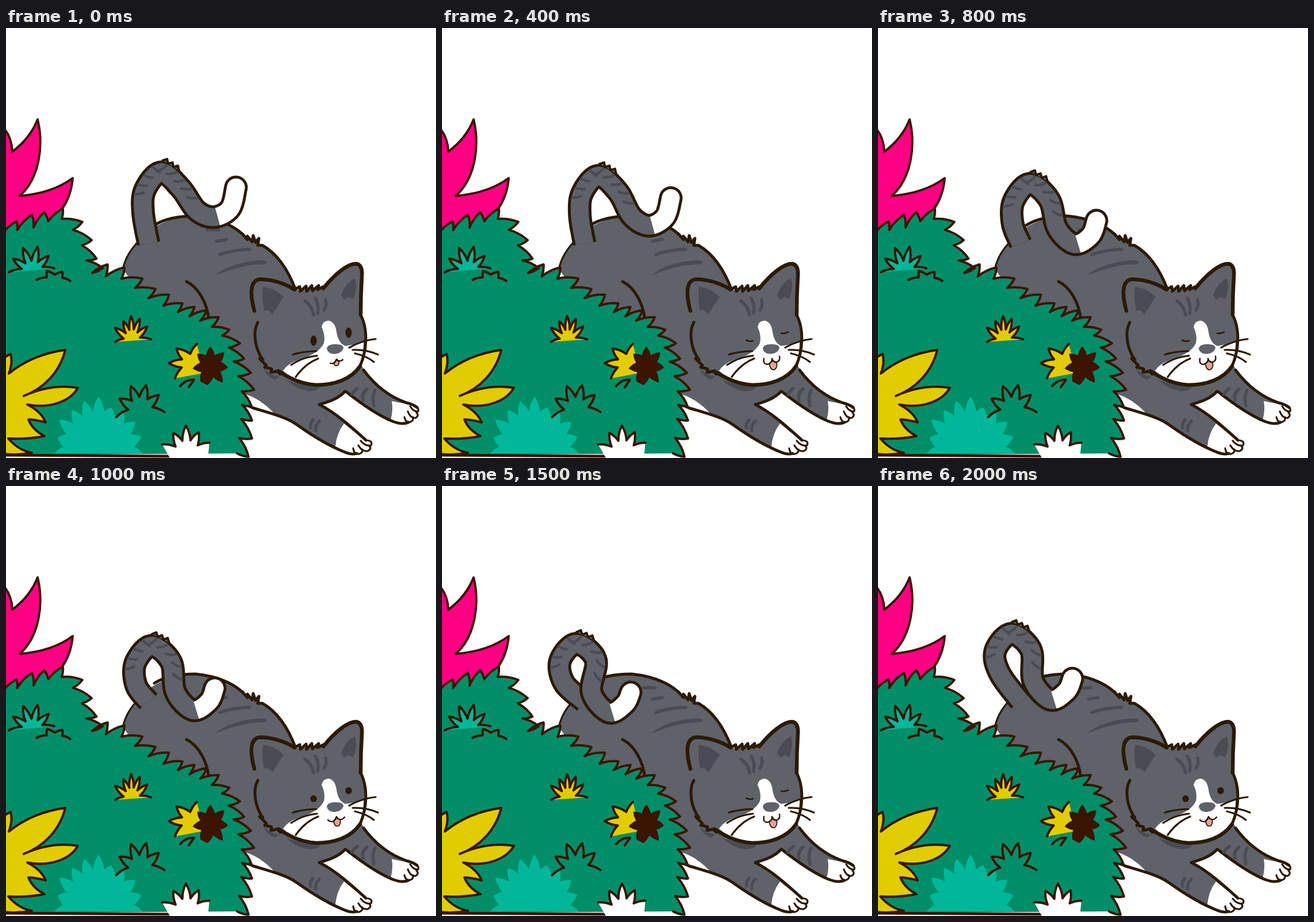
An HTML page for the animation above (2100 ms loop, 748x748 px).

```html
<!DOCTYPE html>
<html lang="en">
<head>
<meta charset="utf-8">
<title>Stretching cat</title>
<style>
  html, body { margin: 0; width: 100%; height: 100%; overflow: hidden; background: #fff; }
  svg { display: block; width: 100vw; height: 100vh; }
  path { stroke-linejoin: round; stroke-linecap: round; }
  .fur { fill: #5f6269; }
  .shade { fill: #4a4c53; }
  .white { fill: #fff; }
  .ink { fill: none; stroke: #2b1a06; stroke-width: 5; }
  .thin { stroke-width: 3.2; }
  .bold { stroke-width: 6.5; }
  .stripe { fill: none; stroke: #4a4c53; stroke-width: 5.5; }
  .butt { stroke-linecap: butt; }
  .line { fill: none; stroke: #3b1402; stroke-width: 4; }
  .dark { fill: #3b1402; }
  .pink { fill: #ff0082; }
  .green { fill: #008e69; }
  .teal { fill: #00b899; }
  .yellow { fill: #e0cc00; }
  .tongue { fill: #e2a49c; stroke: #2b1a06; stroke-width: 1.8; }
</style>
</head>
<body>
<svg viewBox="0 0 748 748" preserveAspectRatio="xMidYMid meet">
  <g id="torso">
    <path class="fur" d="M204 420C208 395 222 376 240 360C262 340 295 327 330 327C372 331 398 345 414 361L446 378C474 395 492 424 504 456L620 590C640 620 668 642 706 655L690 689C655 678 620 654 592 633C580 645 562 650 545 655C575 670 605 698 630 721L592 738C555 722 530 704 505 688C470 676 440 664 420 650L300 560Z"/>
    <path class="white" d="M412 636C430 640 450 652 468 672C450 668 432 662 416 656Z"/>
    <path class="white" d="M588 688C605 702 620 714 632 720Q640 728 628 736Q610 746 590 738L573 728Q575 705 588 688Z"/>
    <path class="white" d="M671 649Q690 653 708 656Q720 660 717 674Q710 686 690 689Q678 687 669 682Q674 665 671 649Z"/>
    <path class="ink thin" d="M203 420C208 398 218 384 232 369"/>
    <path class="ink" d="M258 343C274 333 300 327 330 327C368 331 396 344 413 360"/>
    <path class="ink" d="M411 358L420 368L420 362L428 372L430 361L434 373L440 366L438 378L446 378C474 394 492 424 504 456"/>
    <path class="ink" d="M314 441C336 452 350 480 353 508"/>
    <path class="ink" d="M622 595C642 622 668 642 697 652Q709 655 715 660M592 633C620 655 650 675 672 684Q690 691 700 686"/>
    <path class="ink" d="M590 632C578 645 562 650 545 655C575 670 605 698 626 717M416 655L430 661C460 670 488 677 506 690C534 710 564 728 590 738Q602 743 610 740"/>
    <path class="ink thin" d="M604 731Q605 742 614 741Q621 739 620 733M613 726Q619 737 629 736Q637 732 632 727M617 718Q625 728 635 726Q639 718 626 717"/>
    <path class="ink thin" d="M693 677Q696 688 704 685Q709 683 708 677M699 667Q704 680 713 678Q719 674 714 669M703 658Q709 668 717 667Q719 660 711 657"/>
    <path class="stripe" d="M545 684Q537 691 539 701M534 682Q528 688 530 696M642 630Q636 642 640 657M628 628Q618 636 621 648M611 627Q603 633 602 637"/>
    <path class="stripe" d="M366 371L383 368M350 351L370 351M372 394Q394 386 424 385"/>
    <path class="shade" d="M363 431Q390 407 446 404Q459 406 450 411Q410 411 363 431Z"/>
    <path class="shade" d="M448 592Q462 606 476 606L468 612Q452 605 448 592ZM488 613Q520 622 546 622Q548 631 528 632Q505 629 488 613Z"/>
  </g>

  <g id="tail"></g>

  <g id="head">
    <path class="fur" d="M432 492C424 460 426 438 445 436C468 438 488 446 502 456L553 453C572 428 594 408 610 410Q621 413 620 430L616 500C630 525 628 560 616 588C600 612 570 621 540 621C510 619 485 605 470 596C445 582 428 550 438 511Z"/>
    <path class="white" d="M549 520Q551 509 562 509Q573 512 575 529Q578 548 590 553Q606 551 622 547Q622 583 603 602C582 619 545 624 510 613Q492 606 482 596Q490 583 512 576Q545 566 553 548Q556 535 549 520Z"/>
    <path class="shade" d="M447 450Q467 452 483 468L474 481L464 498L455 490L449 492Q444 470 447 450ZM583 465Q590 444 607 435Q612 451 604 472L596 468L588 473Z"/>
    <path class="stripe" d="M520 475Q533 484 535 499M538 470Q545 482 542 496M556 473Q559 482 553 491"/>
    <path class="ink bold" d="M432 492C424 462 424 438 443 437C466 438 486 445 502 455M552 453C572 428 594 410 609 410Q621 412 619 433Q617 465 617 499"/>
    <path class="ink" d="M502 455L511 450L512 458L522 449L523 458L532 448L533 457L544 448L542 455L552 450M617 499C630 525 628 560 616 588"/>
    <path class="ink bold" d="M616 588C600 612 570 621 540 621C510 619 490 607 474 597"/>
    <path class="ink" d="M438 512C428 530 434 560 447 577L441 575L453 587L450 590L462 593L461 599L472 597L477 602"/>
    <path class="ink thin" d="M499 568Q520 562 540 562M496 586Q515 573 541 570M504 607Q520 584 543 575M597 556Q620 543 643 541M603 560Q626 559 647 568M607 566Q628 571 640 581"/>
    <path class="fur" d="M558 558Q559 550 573 550Q587 550 587 557Q584 566 572 567Q560 567 558 558Z"/>
  </g>
  <g id="face"></g>
  <g id="bush"></g>
</svg>

<script>
const NS = 'http://www.w3.org/2000/svg';
const $ = id => document.getElementById(id);
const INK = '#2b1a06', FUR = '#5f6269';

function add(parent, cls, d, style) {
  const p = document.createElementNS(NS, 'path');
  p.setAttribute('class', cls);
  p.setAttribute('d', d);
  if (style) p.setAttribute('style', style);
  parent.appendChild(p);
  return p;
}

let seed = 7;
const random = () => (seed = seed * 16807 % 2147483647) / 2147483647;

// Catmull-Rom point on a line of [x, y] points, with its unit tangent.
function along(pts, u) {
  const last = pts.length - 1;
  const i = Math.min(Math.floor(u), last - 1);
  const f = u - i;
  const axis = c => {
    const [p, a, b, q] = [-1, 0, 1, 2].map(n => pts[Math.max(0, Math.min(last, i + n))][c]);
    const m = b - p, w = 2 * p - 5 * a + 4 * b - q, z = 3 * a - p - 3 * b + q;
    return [a + (m * f + w * f * f + z * f ** 3) / 2, m + 2 * w * f + 3 * z * f * f];
  };
  const [x, dx] = axis(0), [y, dy] = axis(1);
  const len = Math.hypot(dx, dy) || 1;
  return { x, y, tx: dx / len, ty: dy / len };
}

// Point beside the line: s further along, out to its left.
function beside(pts, u, s, out) {
  const p = along(pts, u);
  return [p.x + p.tx * s + p.ty * out, p.y + p.ty * s - p.tx * out];
}

const at = p => p.map(v => v.toFixed(1)).join(' ');

// Joins valleys and tips with curves that bulge outwards.
function leaves(pts, bulge = 0.12) {
  return pts.map(([x, y], i) => {
    if (!i) return 'M' + at([x, y]);
    const [a, b] = pts[i - 1];
    return 'Q' + at([(a + x) / 2 + (y - b) * bulge, (b + y) / 2 - (x - a) * bulge]) + ' ' + at([x, y]);
  }).join('');
}

// Leaf tips fanned clockwise around a centre; angles in degrees, 0 to the right.
function fan(x, y, rx, ry, from, to, tips, inner) {
  const n = 2 * (tips - 1);
  return leaves(Array.from({ length: n + 1 }, (_, i) => {
    const a = (from + (to - from) * i / n) * Math.PI / 180;
    const r = i % 2 ? inner : 0.9 + 0.2 * random();
    return [x + rx * r * Math.cos(a), y - ry * r * Math.sin(a)];
  }));
}

const bush = $('bush');

function plant(cls, d, close = 'Z', outlined = true) {
  if (cls) add(bush, cls, d + close);
  if (outlined) add(bush, 'line', d);
}

function hedge(contour) {
  const pts = [];
  for (let u = 0; u < contour.length - 1; u += 0.5) {
    pts.push(beside(contour, u, 0, 0), beside(contour, u + 0.35, 9, 15 + 8 * random()));
  }
  return leaves([...pts, contour[contour.length - 1]]);
}

plant('pink', 'M-4 174Q10 190 11 215Q42 192 55 159C66 205 58 262 24 292C60 289 92 279 116 261Q113 300 88 326', 'L60 350L-4 350Z');
plant('green', hedge([
  [-3, 354], [48, 347], [97, 332], [132, 378], [150, 426], [201, 436], [248, 470],
  [299, 494], [338, 509], [376, 535], [396, 580], [410, 632], [409, 680], [402, 740]
]), 'L-3 743Z');
add(bush, 'line', 'M-3 743L150 744L302 745', 'stroke-width:5');

plant('teal', fan(46, 425, 40, 42, 180, 10, 6, 0.48));
plant('', fan(84, 440, 29, 20, 175, 0, 4, 0.55));
plant('teal', fan(161, 740, 78, 92, 180, 0, 11, 0.8), 'Z', false);
plant('yellow', 'M-3 573L8 567Q12 582 5 601C32 579 66 565 103 560C94 598 66 627 31 640C64 625 94 621 125 626C110 652 72 662 37 655Q61 667 69 686Q50 681 39 681Q46 699 67 710Q34 716 4 714Q22 735 45 739Q20 744 -3 741');
plant('yellow', fan(219, 546, 31, 46, 180, 5, 7, 0.48));
plant('yellow', fan(328, 584, 48, 36, 225, 85, 4, 0.5), 'L345 600Z');
plant('dark', fan(356, 588, 32, 34, 235, -100, 8, 0.6), 'Z', false);
add(bush, 'line', 'M303 623Q313 611 326 612M318 625L327 612');
plant('', fan(234, 668, 40, 48, 190, 0, 6, 0.55));
plant('white', fan(315, 750, 44, 56, 155, 30, 5, 0.6), 'L350 760L292 760Z');

// Time, top of the loop x and y, bottom of the hook x and y.
const swing = [
  [0, 270, 251, 362, 329],
  [400, 272, 257, 360, 344],
  [800, 264, 271, 342, 376],
  [1000, 253, 278, 325, 390],
  [1300, 238, 279, 300, 396],
  [1700, 231, 268, 286, 389],
  [2000, 232, 257, 300, 372]
];

function slope(k, j) {
  if (k === 0) return 0;
  const a = swing[k - 1], b = swing[Math.min(k + 1, swing.length - 1)];
  return (b[j] - a[j]) / (b[0] - a[0]);
}

function swingAt(ms) {
  let k = 0;
  while (k < swing.length - 2 && ms >= swing[k + 1][0]) k++;
  const span = swing[k + 1][0] - swing[k][0];
  const s = (ms - swing[k][0]) / span;
  const ease = s * s * (3 - 2 * s);
  return [1, 2, 3, 4].map(j =>
    swing[k][j] + (swing[k + 1][j] - swing[k][j]) * ease +
    span * s * (1 - s) * (slope(k, j) * (1 - s) - slope(k + 1, j) * s));
}

// Centre line of the tail, base to tip; the hook tightens as it sinks.
function tailLine(ms) {
  const [tx, ty, bx, by] = swingAt(ms);
  const drop = by - ty;
  const left = tx - 28;
  return [
    [248, 375], [left + (230 - left) * 0.3, ty + 69], [left, ty + 30],
    [tx, ty], [tx + 34, ty + 28],
    [bx - 30, by + 34 - 0.58 * drop], [bx, by], [bx + 28, by - 15], [bx + 38, by - 83 + 0.4 * drop]
  ];
}

function stretch(pts, from, to) {
  const n = Math.ceil((to - from) * 12);
  return 'M' + Array.from({ length: n + 1 }, (_, i) =>
    at(beside(pts, from + (to - from) * i / n, 0, 0))).join('L');
}

const tail = $('tail');
const tube = (cls, color, width) => add(tail, cls, '', `fill:none;stroke:${color};stroke-width:${width}`);
const parts = [
  [tube('butt', INK, 41), 0, 3.9],
  [tube('butt', FUR, 31), 0, 3.9],
  [tube('', INK, 41), 3.8, 8],
  [tube('', FUR, 31), 3.8, 8],
  [tube('butt', FUR, 31), 2.9, 4.2],
  [tube('', '#fff', 31), 6.9, 8],
  [tube('butt', '#fff', 31), 6.2, 7.2]
];
const bands = add(tail, 'stripe', '', 'stroke-width:4.5');
const tuft = add(tail, 'fur', '', `stroke:${INK};stroke-width:4`);

function drawTail(ms) {
  const pts = tailLine(ms);
  for (const [el, a, b] of parts) el.setAttribute('d', stretch(pts, a, b));

  let d = '';
  for (let u = 1.7; u < 4.8; u += 0.36) {
    const lean = u < 3 ? 5 : -10;
    d += `M${at(beside(pts, u, 0, 14))}Q${at(beside(pts, u, lean * 0.2, 7))} ${at(beside(pts, u, lean, 0))}`;
  }
  bands.setAttribute('d', d);

  const spikes = Array.from({ length: 7 }, (_, i) =>
    at(beside(pts, 3.25, 5.5 * i - 17, i % 2 ? 23 : 17)));
  tuft.setAttribute('d', 'M' + spikes.join('L'));
}

const eye = (x, y, rx, ry) =>
  `M${x - rx} ${y}a${rx} ${ry} 0 1 0 ${2 * rx} 0a${rx} ${ry} 0 1 0 ${-2 * rx} 0Z`;
const eyePair = (rx, ry) => eye(535, 544, rx, ry) + eye(596, 530, rx, ry);

const looks = {
  wide: {
    eyes: eyePair(5.5, 9),
    mouth: 'M564 583Q571 586 575 576Q579 582 586 577',
    tongue: 'M570 583Q572 589 577 587Q580 584 579 580L575 578Z'
  },
  calm: {
    eyes: eyePair(5.7, 6),
    mouth: 'M560 581Q569 589 575 575Q581 585 589 576',
    tongue: 'M570 584Q572 594 579 591Q583 587 581 580L575 578Z'
  },
  shut: {
    eyes: '',
    lids: 'M529 543Q535 546 541 544M590 531Q596 532 602 529',
    mouth: 'M560 575Q558 585 566 585Q575 583 574 575Q577 583 583 581Q589 578 587 571',
    tongue: 'M569 584Q572 597 579 594Q584 590 582 581L575 579Z'
  }
};

// The face goes wide, calm, shut, calm twice per loop.
function lookAt(ms) {
  const p = ms % 1100;
  if (p < 200) return looks.wide;
  return p >= 400 && p < 900 && ms < 1900 ? looks.shut : looks.calm;
}

const face = $('face');
const tongue = add(face, 'tongue', '');
const mouth = add(face, 'ink', '', 'stroke-width:2.4');
const lids = add(face, 'ink', '', 'stroke-width:2.6');
const eyes = add(face, '', '', `fill:${INK}`);

function drawFace(ms) {
  const look = lookAt(ms);
  tongue.setAttribute('d', look.tongue);
  mouth.setAttribute('d', look.mouth);
  lids.setAttribute('d', look.lids || '');
  eyes.setAttribute('d', look.eyes);
}

const STEP = 100, LOOP = 2100;
const start = performance.now();
let shown = -1;

function tick() {
  const ms = Math.floor((performance.now() - start) % LOOP / STEP) * STEP;
  if (ms !== shown) {
    shown = ms;
    drawTail(ms);
    drawFace(ms);
  }
  requestAnimationFrame(tick);
}
tick();
</script>
</body>
</html>
```
